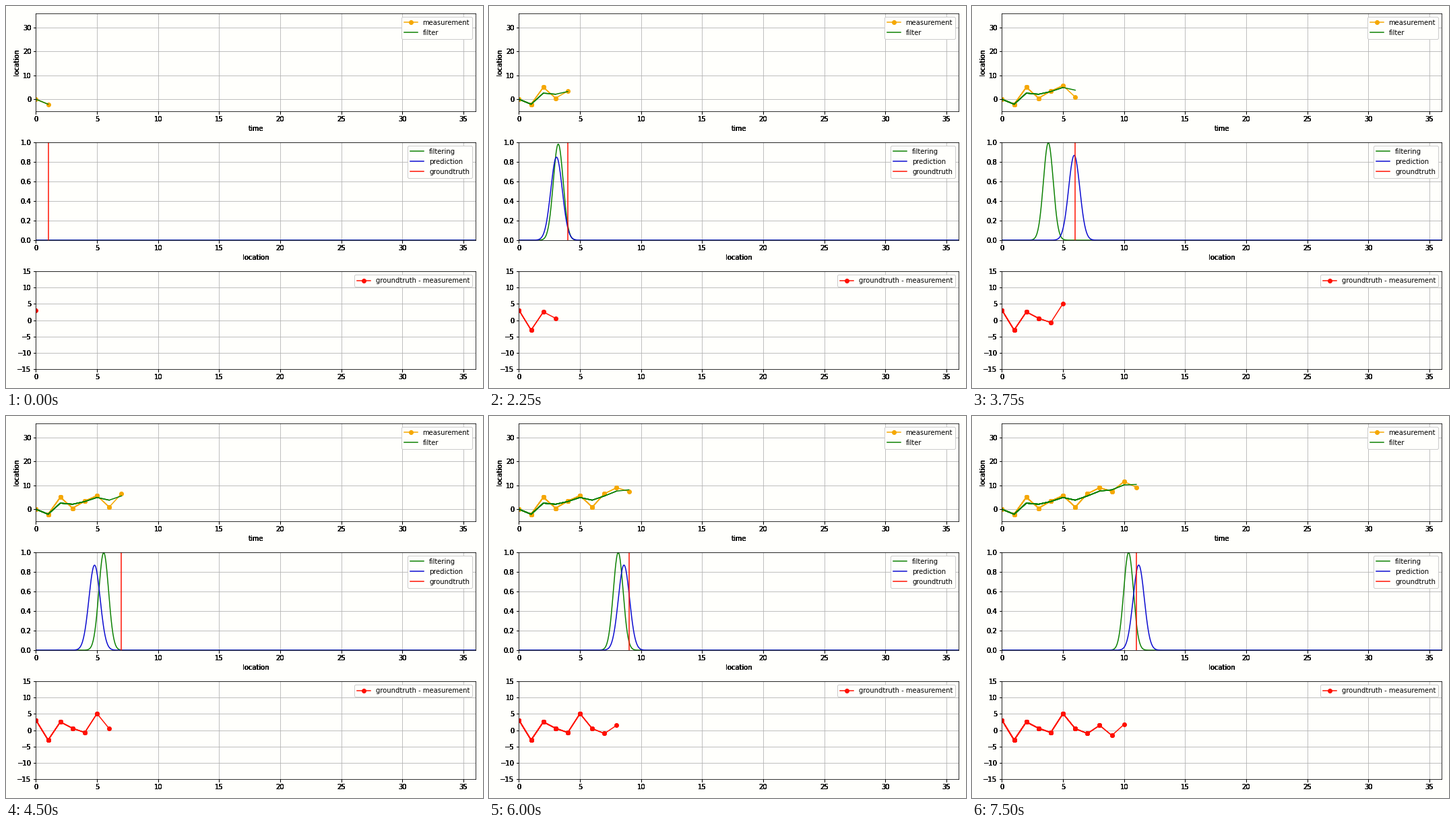
A matplotlib script for the animation above (8 s loop, 708 px wide and 566 px high).

```python
import matplotlib.pyplot as plt
import numpy as np
from matplotlib.animation import FuncAnimation

W, H, DPI = 708, 566, 72
INTERVAL, FRAMES, HOLD = 250, 32, 3
STEPS = -(-FRAMES // HOLD)
SPAN = 36
LEFT, TOP, WIDTH, HEIGHT, PITCH = 44.4, 10.8, 652.7, 145, 191.15
LAYERS = 5
PAPER = "#fffffc"
ORANGE, GREEN, BLUE, RED = "#f5a800", "#0a8000", "#0808d0", "#ff1000"

measured = np.array([0, -2.1, 5, 0.45, 3.4, 5.7, 0.9, 6.5, 9, 7.5, 11.6, 9.2])
filtered = np.array([0, -2.1, 2.55, 2.08, 3.22, 4.92, 3.8,
                     5.55, 7.6, 8.13, 10.2, 10.37])
predicted = np.append(0, filtered[:-1] + 1)
time = np.arange(len(measured))
error = (time - measured)[1:]
grid_x = np.linspace(0, SPAN, 1000)

plt.rcParams.update({"font.family": "DejaVu Sans", "font.size": 10})
fig = plt.figure(figsize=(W / DPI, H / DPI), dpi=DPI, facecolor=PAPER)


def add_panel(row, ylim, yticks, xlabel="", ylabel=""):
    """Add one plot; label-only copies beneath it darken the lettering."""
    bottom = TOP + row * PITCH + HEIGHT
    box = [LEFT / W, 1 - bottom / H, WIDTH / W, HEIGHT / H]
    for layer in range(LAYERS):
        ax = fig.add_axes(box, facecolor="none", label=f"{row}-{layer}")
        ax.set(xlim=(0, SPAN), ylim=ylim, xticks=range(0, SPAN, 5),
               yticks=yticks, xlabel=xlabel, ylabel=ylabel)
        if layer < LAYERS - 1:
            ax.spines[:].set_visible(False)
    ax.grid(True)
    return ax


def add_trails(ax, color, label, marker=None):
    """One line per step, since each step plots its history over the last."""
    return [ax.plot([], [], color=color, marker=marker,
                    label=label if i == 0 else "_" + label)[0]
            for i in range(STEPS)]


def bell(mean, peak):
    return peak * np.exp(-np.pi * (peak * (grid_x - mean)) ** 2)


track = add_panel(0, (-5, 36), range(0, 31, 10), "time", "location")
density = add_panel(1, (0, 1), np.linspace(0, 1, 6), "location")
residual = add_panel(2, (-15, 15), range(-15, 16, 5))

measure_lines = add_trails(track, ORANGE, "measurement", "o")
filter_lines = add_trails(track, GREEN, "filter")
error_lines = add_trails(residual, RED, "groundtruth - measurement", "o")

filter_curve, = density.plot([], [], color=GREEN, label="filtering")
predict_curve, = density.plot([], [], color=BLUE, label="prediction")
truth_line, = density.plot([], [], color=RED, label="groundtruth")

for panel in (track, density, residual):
    panel.legend(loc="upper right", framealpha=1, facecolor=PAPER)


def update(frame):
    step = frame // HOLD
    now = step + 1
    for i in range(STEPS):
        n = i + 2 if i <= step else 0
        measure_lines[i].set_data(time[:n], measured[:n])
        filter_lines[i].set_data(time[:n], filtered[:n])
        m = max(n - 1, 0)
        error_lines[i].set_data(time[:m], error[:m])

    filter_peak = 0.998 - 0.1 * 0.4 ** (now - 2)
    # The first prediction is too diffuse to show.
    predict_peak = 0.87 - 0.15 * 0.38 ** (now - 2) if now > 1 else 0
    filter_curve.set_data(grid_x, bell(filtered[now], filter_peak))
    predict_curve.set_data(grid_x, bell(predicted[now], predict_peak))
    truth_line.set_data([now, now], [0, 1])
    return []


anim = FuncAnimation(fig, update, frames=FRAMES, init_func=lambda: update(0),
                     interval=INTERVAL, repeat=True, repeat_delay=0)
plt.show()
```
